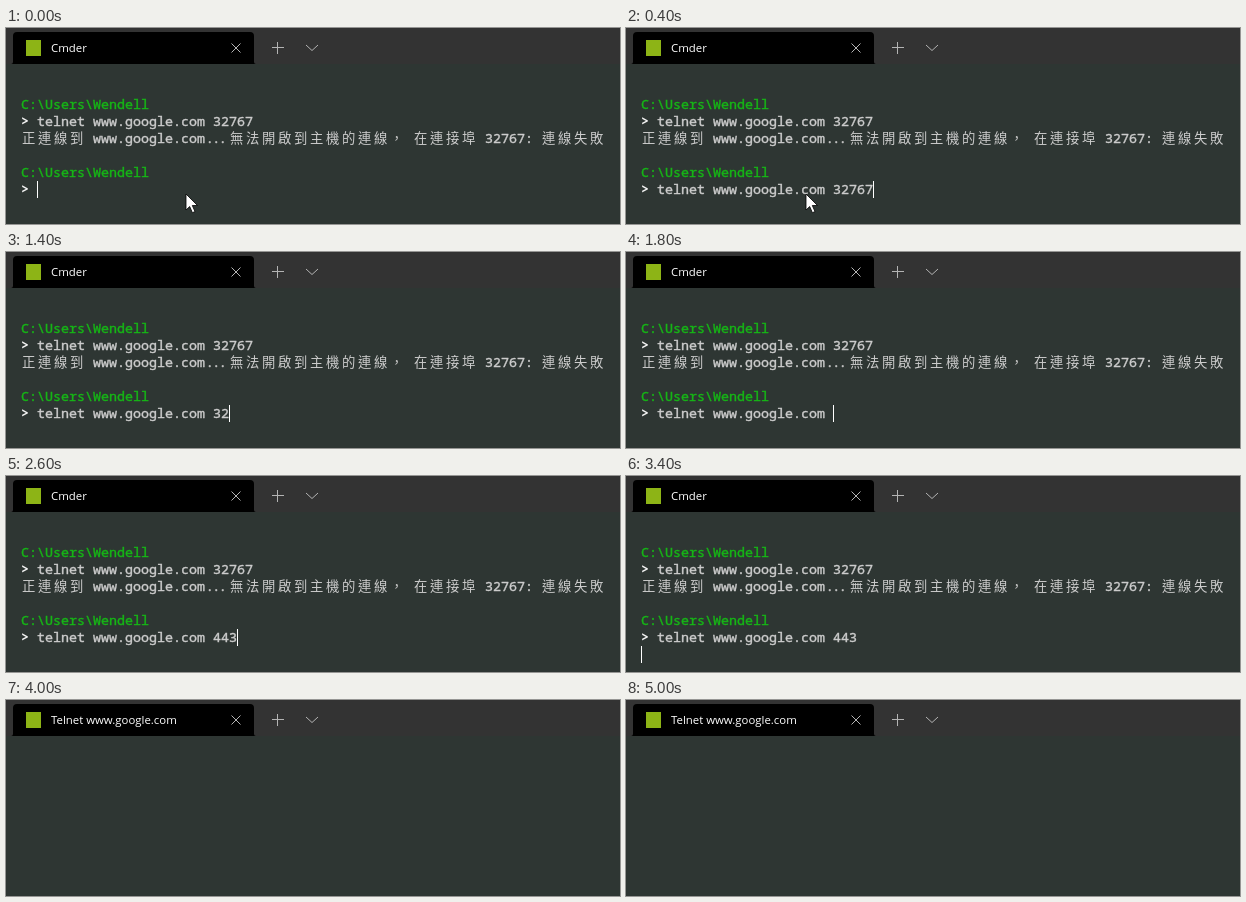
Write an HTML page that moves like this. It is 614 px wide and 196 px high and loops after 5400 ms.

```html
<!DOCTYPE html>
<html lang="zh-Hant">
<head>
<meta charset="utf-8">
<title>Terminal</title>
<style>
  html, body { margin: 0; width: 100%; height: 100%; overflow: hidden; background: #2e3633; }
  svg { display: block; width: 614px; height: 196px; }
  text { white-space: pre; font: 400 13.333px "Noto Sans Mono", monospace; fill: #ccc; stroke: #ccc; stroke-width: .4px; }
  .dir { fill: #16b516; stroke: #16b516; }
  .mark { font-weight: 700; fill: #f2f2f2; stroke: none; }
  .dots { letter-spacing: -1.5px; }
  .cjk { font: 400 13.333px "Noto Sans CJK TC", "Noto Sans CJK", "Noto Sans CJK JP", sans-serif; letter-spacing: 2.667px; stroke: none; }
  #title { font: 400 11.4px "Open Sans", sans-serif; fill: #fff; stroke: none; }
  .icon { fill: none; stroke: #b4b4b4; }
</style>
</head>
<body>
<svg viewBox="0 0 614 196">
  <rect width="614" height="36" fill="#333"/>
  <path d="M5 36q2 0 2-2V8q0-4 4-4H244q4 0 4 4V34q0 2 2 2z"/>
  <rect x="20" y="12" width="15" height="16" fill="#8db416"/>
  <text id="title" x="45" y="24"></text>
  <path class="icon" d="M225.5 15.5l9 9m0-9l-9 9M266 19.5h12M271.5 14v12M300 17l6 5.5 6-5.5"/>
  <g id="screen"></g>
  <rect id="caret" width="1" height="17" fill="#fff"/>
  <path id="mouse" d="M180 166v16l3.7-3.5 2.7 6.2 2.6-1.1-2.7-6.1h5.2z" fill="#fff" stroke="#000" stroke-width=".8"/>
</svg>
<script>
const LOOP = 5400, CELL = 8, LINE = 17, LEFT = 15, TOP = 51;
const $ = id => document.getElementById(id);
const colX = col => LEFT + col * CELL;
const rowY = row => TOP + row * LINE;

function put(col, row, str, cls = "") {
  const el = document.createElementNS("http://www.w3.org/2000/svg", "text");
  el.setAttribute("x", colX(col) + (cls === "cjk" ? 1 : 0));
  el.setAttribute("y", rowY(row) + 13);
  el.setAttribute("class", cls);
  el.textContent = str;
  $("screen").append(el);
  return el;
}

function prompt(row, command) {
  put(0, row, "C:\\Users\\Wendell", "dir");
  put(0, row + 1, ">", "mark");
  return put(2, row + 1, command);
}

const host = "www.google.com", base = `telnet ${host} `;
prompt(1, base + "32767");
put(0, 3, "正連線到", "cjk");
put(9, 3, host);
put(23.1, 3, "...", "dots");
put(26, 3, "無法開啟到主機的連線，", "cjk");
put(49, 3, "在連接埠", "cjk");
put(58, 3, "32767:");
put(65, 3, "連線失敗", "cjk");
const input = prompt(5, "");

// The port is erased key by key, then the new one is typed.
function typed(t) {
  if (t < 400) return "";
  if (t < 1000) return base + "32767";
  const key = Math.floor((t - 1000) / 200);
  return base + (key < 5 ? "32767".slice(0, 4 - key) : "443".slice(0, key - 4));
}

function draw(t) {
  const connected = t >= 3600, entered = t >= 3400;
  const line = typed(t);
  const col = entered ? 0 : 2 + line.length;
  const row = connected ? 0 : entered ? 7 : 6;
  const hidden = (t >= 3000 && t < 3400) || (t >= 4000 && t < 4600) || t >= 5000;

  $("title").textContent = connected ? `Telnet ${host}` : "Cmder";
  $("screen").style.display = connected ? "none" : "";
  $("mouse").style.display = t < 1000 ? "" : "none";
  input.textContent = line;
  $("caret").setAttribute("x", colX(col));
  $("caret").setAttribute("y", rowY(row));
  $("caret").style.display = hidden ? "none" : "";
}

const start = performance.now();
function tick() {
  draw((performance.now() - start) % LOOP);
  requestAnimationFrame(tick);
}
tick();
</script>
</body>
</html>
```
